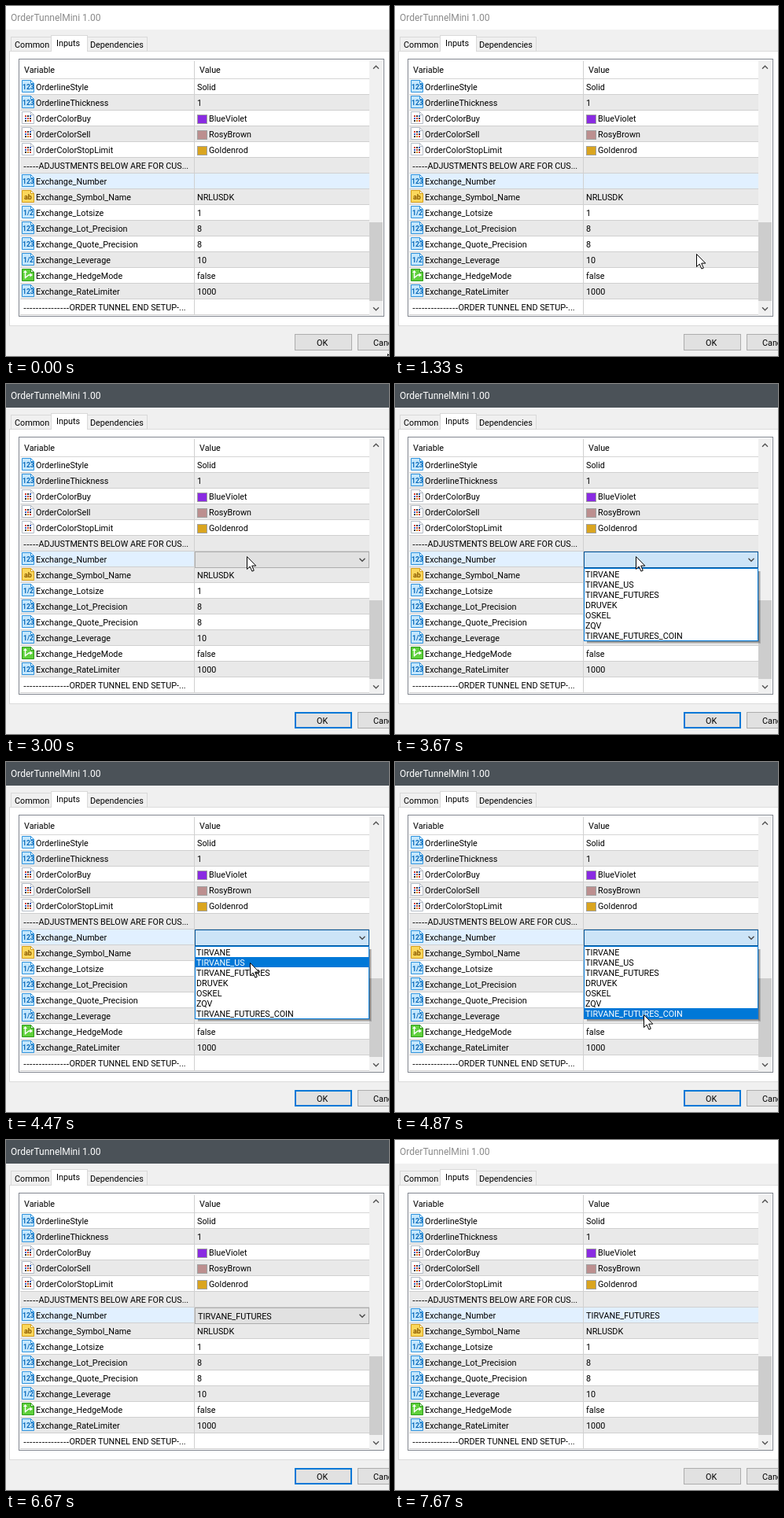
An HTML page with a canvas that plays this animation: 487x445 px, repeating every 7940 ms.

```html
<!DOCTYPE html>
<html lang="en">
<head>
<meta charset="utf-8">
<title>Input settings</title>
<style>
html, body { margin: 0; width: 100%; height: 100%; overflow: hidden; background: #f0f0f0; }
canvas { display: block; }
</style>
</head>
<body>
<canvas id="stage" width="487" height="445"></canvas>
<script>
const ctx = document.getElementById('stage').getContext('2d', { alpha: false });
const LOOP = 7940, TICK = 1000 / 15;
const UI = '10.8px Roboto, sans-serif';
const DASH = '10.8px "DejaVu Sans", sans-serif';
const BLUE = '#0078d7', PALE = '#e1f0ff';
const ROW_TOP = 93, ROW_H = 20, LIST_TOP = 234, ITEM_H = 13, PICK_ROW = 6;

const rows = [
  ['int', 'OrderlineStyle', 'Solid'],
  ['int', 'OrderlineThickness', '1'],
  ['color', 'OrderColorBuy', 'BlueViolet'],
  ['color', 'OrderColorSell', 'RosyBrown'],
  ['color', 'OrderColorStopLimit', 'Goldenrod'],
  ['', '-----ADJUSTMENTS BELOW ARE FOR CUS...', ''],
  ['int', 'Exchange_Number', ''],
  ['text', 'Exchange_Symbol_Name', 'NRLUSDK'],
  ['real', 'Exchange_Lotsize', '1'],
  ['int', 'Exchange_Lot_Precision', '8'],
  ['int', 'Exchange_Quote_Precision', '8'],
  ['real', 'Exchange_Leverage', '10'],
  ['bool', 'Exchange_HedgeMode', 'false'],
  ['int', 'Exchange_RateLimiter', '1000'],
  ['', '---------------ORDER TUNNEL END SETUP-...', '']
];
const items = ['TIRVANE', 'TIRVANE_US', 'TIRVANE_FUTURES', 'DRUVEK', 'OSKEL', 'ZQV', 'TIRVANE_FUTURES_COIN'];
const CHOICE = 2;

// Pointer legs in ticks: from, to, start point, end point.
const legs = [
  [14, 25, 486, 443, 307, 220],
  [63, 73, 307, 220, 317, 322],
  [77, 84, 317, 322, 320, 267],
  [89, 99, 320, 267, 141, 439]
];

const clamp = v => Math.max(0, Math.min(1, v));
const ease = p => p * p * (3 - 2 * p);
const mix = (a, b, p) => `rgb(${a.map((v, i) => Math.round(v + (b[i] - v) * p))})`;

function rect(x, y, w, h, fill) {
  ctx.fillStyle = fill;
  ctx.fillRect(x, y, w, h);
}

function box(x, y, w, h, fill, border, t = 1) {
  rect(x, y, w, h, border);
  rect(x + t, y + t, w - 2 * t, h - 2 * t, fill);
}

function text(str, x, y, color = '#000', font = UI) {
  ctx.font = font;
  ctx.fillStyle = color;
  ctx.fillText(str, x, y);
}

function label(str, x, y, color) {
  const dashes = str.match(/^-*/)[0];
  text(dashes, x, y, color, DASH);
  text(str.slice(dashes.length), x + ctx.measureText(dashes).width, y, color);
}

function poly(points, fill, stroke) {
  ctx.beginPath();
  points.forEach(([x, y]) => ctx.lineTo(x, y));
  ctx.closePath();
  if (fill) { ctx.fillStyle = fill; ctx.fill(); }
  if (stroke) { ctx.strokeStyle = stroke; ctx.lineWidth = 1; ctx.stroke(); }
}

function chevron(x, y, dir, color, size) {
  ctx.beginPath();
  ctx.moveTo(x - size, y - dir * size / 2);
  ctx.lineTo(x, y + dir * size / 2);
  ctx.lineTo(x + size, y - dir * size / 2);
  ctx.strokeStyle = color;
  ctx.lineWidth = 1.3;
  ctx.stroke();
}

function icon(kind, x, y) {
  const [fill, edge] = {
    int: ['#c4e7fd', '#2f93dd'], real: ['#c4e7fd', '#2f93dd'],
    text: ['#fbd75c', '#d6a01c'], bool: ['#5fd03c', '#2f9a1b'], color: ['#fff', '#b4bcc6']
  }[kind];
  poly([[x + .5, y + .5], [x + 11.5, y + .5], [x + 15.5, y + 4.5], [x + 15.5, y + 15.5], [x + .5, y + 15.5]], fill, edge);
  poly([[x + 11.5, y + .5], [x + 11.5, y + 4.5], [x + 15.5, y + 4.5]], '#fff', edge);
  const bold = 'bold 8.5px Roboto, sans-serif';
  if (kind === 'int') text('123', x + 1, y + 12, '#0868b8', bold);
  if (kind === 'real') text('1/2', x + 2, y + 12, '#0868b8', bold);
  if (kind === 'text') text('ab', x + 3, y + 12, '#8a5a00', 'bold 9px Roboto, sans-serif');
  if (kind === 'color') {
    const dots = ['#d23a2e', '#333', '#2f62c8', '#2f62c8', '#d23a2e', '#333', '#333', '#d08a20', '#d23a2e'];
    dots.forEach((c, i) => rect(x + 4 + i % 3 * 3, y + 5 + Math.floor(i / 3) * 3, 2, 2, c));
  }
  if (kind === 'bool') {
    ctx.beginPath();
    ctx.moveTo(x + 4.5, y + 3); ctx.lineTo(x + 4.5, y + 12.5);
    ctx.moveTo(x + 4.5, y + 11.5); ctx.lineTo(x + 9, y + 8); ctx.lineTo(x + 12, y + 8);
    ctx.strokeStyle = '#fff'; ctx.lineWidth = 1.5; ctx.stroke();
    poly([[x + 2, y + 5], [x + 4.5, y + 2], [x + 7, y + 5]], '#fff');
    poly([[x + 10.5, y + 5.5], [x + 14, y + 8], [x + 10.5, y + 10.5]], '#fff');
  }
}

function drawWindow(active) {
  rect(0, 0, 487, 445, '#f0f0f0');
  rect(0, 0, 487, 30, active ? '#4b5258' : '#fff');
  text('OrderTunnelMini 1.00', 6, 19, active ? '#fff' : '#8a8a8a', '12px Roboto, sans-serif');

  box(4, 57, 500, 350, '#fff', '#dcdcdc');
  box(6, 39, 52, 19, '#f0f0f0', '#d9d9d9');
  box(103, 39, 77, 19, '#f0f0f0', '#d9d9d9');
  box(57, 37, 47, 21, '#fff', '#d9d9d9');
  rect(58, 57, 45, 2, '#fff');
  text('Common', 11, 53);
  text('Inputs', 64, 51);
  text('Dependencies', 107, 53);

  box(367, 417, 73, 21, '#e1e1e1', active ? BLUE : '#adadad', active ? 2 : 1);
  box(447, 417, 75, 21, '#e1e1e1', '#adadad');
  text('OK', 395, 432);
  text('Cancel', 467, 432);
}

function drawTable(selected, value) {
  box(16, 67, 465, 328, '#fff', '#828790');
  text('Variable', 23, 85);
  text('Value', 246, 85);
  rect(18, 92, 444, 1, '#d5d5d5');

  rows.forEach(([kind, name, val], i) => {
    const y = ROW_TOP + i * ROW_H, picked = i === PICK_ROW;
    const ink = picked && selected ? '#fff' : '#000';
    const fill = picked ? (selected ? BLUE : PALE) : i % 2 ? '#e9e9e9' : '#fff';
    rect(18, y, 444, ROW_H, fill);
    rect(18, y + ROW_H - 1, 444, 1, picked && selected ? BLUE : '#d0d0d0');
    if (kind) icon(kind, 20, y + 1);
    label(name, kind ? 38 : 22, y + 14, ink);
    if (kind === 'color') {
      box(243, y + 5, 13, 12, val.toLowerCase(), '#a0a0a0');
      text(val, 258, y + 14);
    } else {
      text(picked ? value : val, 243, y + 14, ink);
    }
  });
  rect(239, 70, 1, 323, '#d0d0d0');

  rect(462, 69, 17, 325, '#f0f0f0');
  rect(462, 275, 17, 100, '#cdcdcd');
  chevron(470.5, 78, -1, '#505050', 3.5);
  chevron(470.5, 385, 1, '#505050', 3.5);
}

function drawCombo(k, value) {
  const idle = [[225, 225, 225], [173, 173, 173]];
  const hover = [[229, 241, 251], [0, 120, 215]];
  const press = [[204, 228, 247], [0, 84, 153]];
  const heat = k < 89 ? clamp((k - 45) / 4) : 1 - clamp((k - 89) / 4);
  const warm = k >= 52 ? press : hover;
  const [fill, edge] = idle.map((c, i) => mix(c, warm[i], heat));
  box(240, 213, 222, 21, fill, edge);
  text(value, 244, 228);
  chevron(453, 223.5, 1, '#444', 3.5);
}

function drawList(open, pointerY) {
  const h = items.length * ITEM_H + 2;
  if (open === 1) {
    for (let i = 3; i > 0; i--) rect(244, LIST_TOP + 4, 218 + i, h - 4 + i, 'rgba(0,0,0,.16)');
  }
  ctx.save();
  ctx.beginPath();
  ctx.rect(240, LIST_TOP, 222, h);
  ctx.clip();
  ctx.translate(0, -Math.round((1 - open) * h));
  box(240, LIST_TOP, 222, h, '#fff', BLUE);
  const hot = Math.floor((pointerY - LIST_TOP - 1) / ITEM_H);
  items.forEach((name, i) => {
    const y = LIST_TOP + 1 + i * ITEM_H;
    if (i === hot) rect(241, y, 220, ITEM_H, BLUE);
    text(name, 242, y + 11, i === hot ? '#fff' : '#000');
  });
  ctx.restore();
}

function pointerAt(k) {
  const leg = legs.filter(l => k >= l[0]).pop() || legs[0];
  const [from, to, x0, y0, x1, y1] = leg;
  const p = ease(clamp((k - from) / (to - from)));
  return [Math.round(x0 + (x1 - x0) * p), Math.round(y0 + (y1 - y0) * p)];
}

function drawPointer(x, y) {
  const shape = [[0, 0], [0, 16], [3.7, 12.6], [6.4, 18.6], [8.8, 17.6], [6.2, 11.6], [11.3, 11.6]];
  poly(shape.map(([dx, dy]) => [x + dx - .5, y + dy - .5]), '#fff', '#000');
}

function draw(now) {
  const k = Math.floor((now % LOOP + 4) / TICK);
  const active = k >= 27 && k < 115;
  const value = k >= 89 ? items[CHOICE] : '';
  const [x, y] = pointerAt(k);
  drawWindow(active);
  drawTable(k >= 28 && k < 45, value);
  if (k >= 45 && k < 115) drawCombo(k, value);
  if (k >= 52 && k < 89) drawList(clamp((k - 51) / 4), y);
  if (k < 100) drawPointer(x, y);
}

const start = performance.now();
function loop() {
  draw(performance.now() - start);
  requestAnimationFrame(loop);
}
loop();
</script>
</body>
</html>
```
